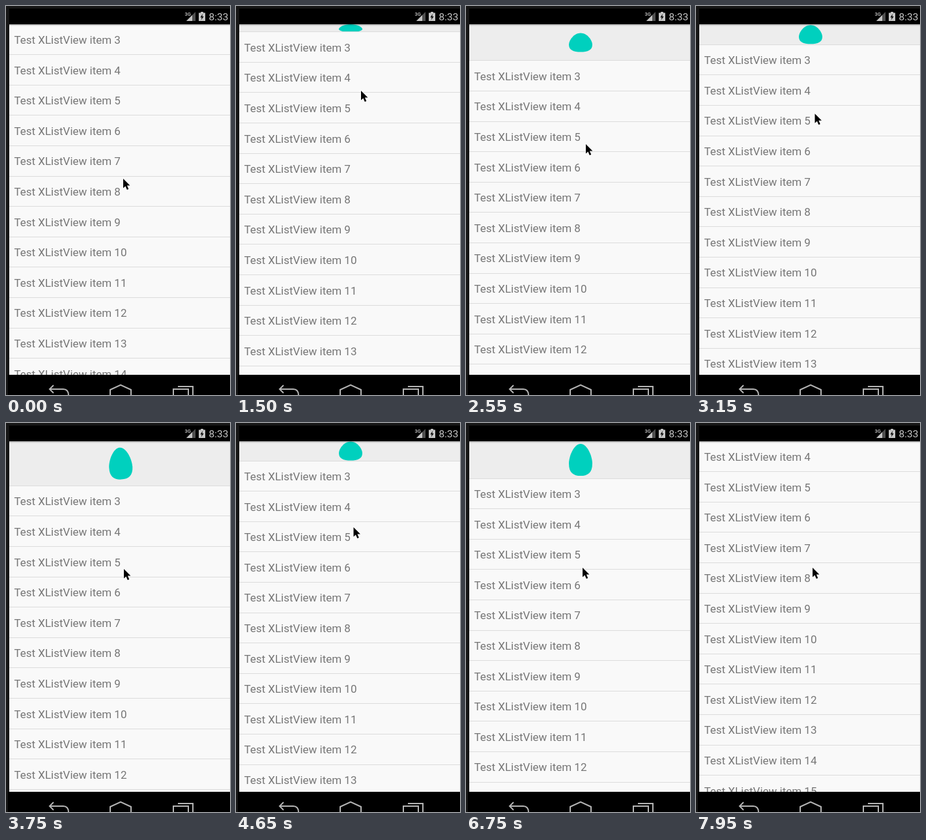
An HTML page for the animation above (8000 ms loop, 344 px wide and 597 px high).

```html
<!DOCTYPE html>
<html lang="en">
<head>
<meta charset="utf-8">
<title>Pull to refresh</title>
<style>
  html, body { margin: 0; width: 100%; height: 100%; overflow: hidden; background: #000; }
  svg { display: block; width: 344px; height: 597px; font-family: Roboto, sans-serif; }
  #rows text { font-size: 17px; fill: #767676; }
  #rows rect { fill: #dcdcdc; }
  .nav { fill: none; stroke: #b4b4b4; stroke-width: 2; }
</style>
</head>
<body>
<svg viewBox="0 0 344 597">
  <defs>
    <linearGradient id="shade" x2="0" y2="1">
      <stop offset="0" stop-color="#000" stop-opacity=".28"/>
      <stop offset="1" stop-color="#000" stop-opacity="0"/>
    </linearGradient>
    <clipPath id="clip"><rect id="clipBox" x="5" y="28" width="339"/></clipPath>
  </defs>
  <rect width="344" height="597" fill="#161616"/>
  <rect x="5" y="28" width="339" height="538" fill="#f9f9f9"/>
  <rect id="head" x="5" y="28" width="339" fill="#ededed"/>
  <g clip-path="url(#clip)">
    <path id="blob" fill="#00d0be" d="M0-.5C10-.5 18-.12 18 .12C18 .4 11 .5 0 .5S-18 .4-18 .12C-18-.12-10-.5 0-.5Z"/>
  </g>
  <g id="rows"></g>
  <rect x="5" y="28" width="339" height="3" fill="url(#shade)"/>

  <rect x="5" y="4" width="339" height="24"/>
  <rect x="3" y="566" width="341" height="31"/>
  <g fill="#c6c6c6">
    <text x="274.5" y="15" font-size="7.5" font-weight="500">3G</text>
    <path d="M291 9V23H277Z" fill="#505050"/>
    <path d="M286 14V23H277Z"/>
    <path d="M299 9H303V10.5H306V23H296V10.5H299Z"/>
    <path d="M302 12L298.5 17.5H300.7L299.8 21.5L303.6 16H301.3Z" fill="#000"/>
    <text x="311.5" y="22" font-size="15.5">8:33</text>
  </g>
  <path class="nav" d="M73 582L67 588L73 594M67 588H88C94 588 96 592 96 598"/>
  <path class="nav" d="M160 598V589L176 581.5L192 589V598"/>
  <path class="nav" d="M257 598V588H280V598M264 584H287V598"/>

  <path id="cursor" d="M0 0V14.5L3.4 11.4L5.8 17L8.3 15.9L5.9 10.5H10.5Z"
    fill="#000" stroke="#fff" stroke-width="1.1" paint-order="stroke"/>
</svg>
<script>
const LOOP = 8000, STEP = 150, TOP = 28, PITCH = 46.6, COUNT = 12, REST = 57;
const RELEASE = 6150, RELOAD = 7560;

const smooth = p => (1 - Math.cos(Math.PI * p)) / 2;
const decel = p => 1 - (1 - p) ** 2;
const linear = p => p;

// time, pull distance, easing towards this key
const pull = [
  [1100, 0], [1500, 11.7, linear], [2550, 55.8, linear], [2800, 64, decel],
  [3200, 30], [3750, 68.3], [4650, 30], [5550, 66], [RELEASE, 66],
  [6550, REST, decel], [RELOAD, REST], [7960, 0, decel]
];
// time, x, y of the pointer tip
const pathX = [[150, 180], [1100, 193], [1500, 192], [2550, 184], [3750, 181], [5550, 180], [6450, 179]];
const pathY = [
  [150, 265], [1100, 109], [1500, 130, linear], [2550, 212, linear], [2800, 222, decel],
  [3200, 163], [3750, 224], [4650, 160], [5550, 226], [RELEASE, 226], [6450, 222]
];

function valueAt(keys, t) {
  if (t <= keys[0][0]) return keys[0][1];
  for (let i = 1; i < keys.length; i++) {
    const [t0, a] = keys[i - 1], [t1, b, ease = smooth] = keys[i];
    if (t <= t1) return a + (b - a) * ease((t - t0) / (t1 - t0));
  }
  return keys[keys.length - 1][1];
}

const byId = id => document.getElementById(id);
function add(parent, tag, attrs) {
  const el = document.createElementNS("http://www.w3.org/2000/svg", tag);
  set(el, attrs);
  return parent.appendChild(el);
}
function set(el, attrs) {
  for (const k in attrs) el.setAttribute(k, attrs[k]);
}

const rows = Array.from({ length: COUNT }, () => ({
  back: add(byId("rows"), "rect", { x: 5, width: 339, height: PITCH + 1, style: "fill:#f9f9f9" }),
  line: add(byId("rows"), "rect", { x: 5, width: 339, height: 1 }),
  label: add(byId("rows"), "text", { x: 12.4 })
}));

function blobHeight(t, d) {
  if (t >= RELEASE) return 49;
  const grown = Math.min(1, Math.max(0, (d - 56) / 4));
  return Math.min(d, 29) + 20 * grown;
}

function draw(t) {
  const d = valueAt(pull, t), first = t < RELOAD ? 3 : 4;
  set(byId("head"), { height: d });
  set(byId("clipBox"), { height: d });

  const h = blobHeight(t, d);
  const tilt = h > 40 ? -3 * Math.cos(2 * Math.PI * (t - 3750) / 800) : 0;
  set(byId("blob"), { transform: `translate(176 ${TOP + d / 2}) rotate(${tilt}) scale(1 ${h})` });

  rows.forEach((row, i) => {
    const y = TOP + d + i * PITCH;
    set(row.back, { y: Math.floor(y) });
    set(row.line, { y: Math.floor(y) });
    set(row.label, { y: y + 30 });
    row.label.textContent = "Test XListView item " + (first + i);
  });

  set(byId("cursor"), { transform: `translate(${valueAt(pathX, t)} ${valueAt(pathY, t)})` });
}

const start = performance.now();
function tick() {
  const t = (performance.now() - start) % LOOP;
  draw(Math.floor(t / STEP) * STEP);
  requestAnimationFrame(tick);
}
tick();
</script>
</body>
</html>
```
